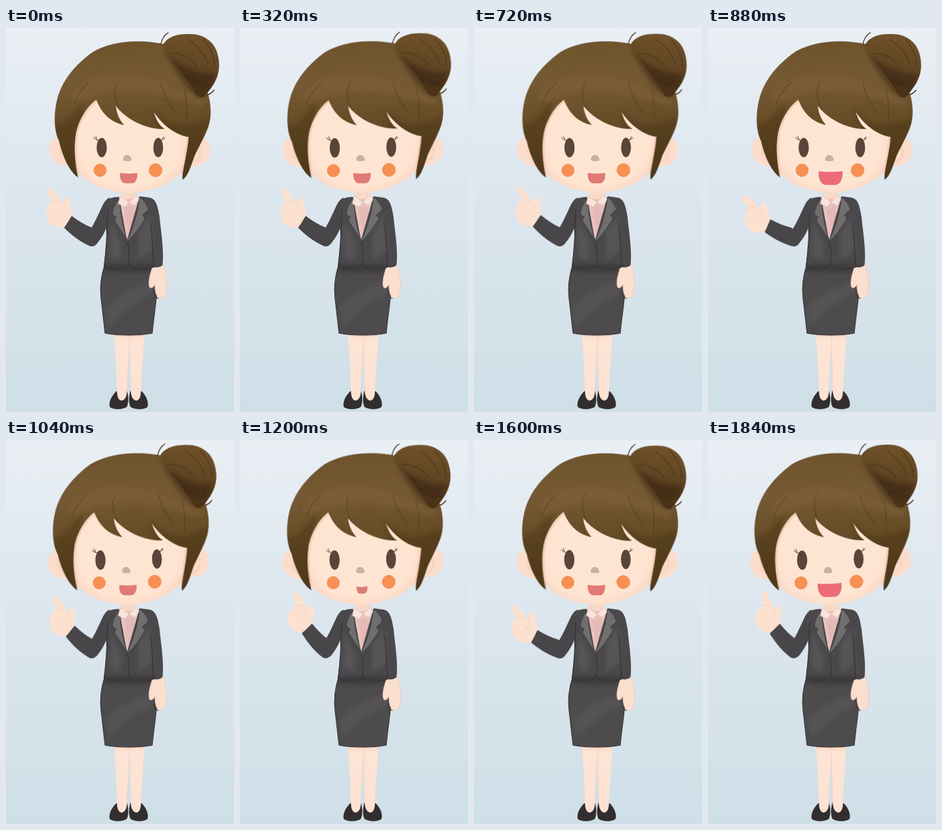
An HTML page that plays this animation: 343x575 px, repeating every 1.92 s.

```html
<!DOCTYPE html>
<html lang="en">
<head>
<meta charset="utf-8">
<title>Pointing assistant</title>
<style>
  html, body { margin: 0; width: 100%; height: 100%; overflow: hidden; background: #dce6ee; }
  svg { display: block; width: 343px; height: 575px; }
  .line { fill: none; stroke-linecap: round; stroke-linejoin: round; }
  .soft { filter: url(#blur); }
  .crayon { filter: url(#fuzz); }
</style>
</head>
<body>
<svg viewBox="0 0 343 575">
  <defs>
    <linearGradient id="sky" x2="0" y2="1">
      <stop offset="0" stop-color="#e9eff4"/>
      <stop offset=".45" stop-color="#dce6ee"/>
      <stop offset="1" stop-color="#cfdfe7"/>
    </linearGradient>
    <linearGradient id="hairFill" gradientUnits="userSpaceOnUse" x1="180" y1="20" x2="190" y2="225">
      <stop offset="0" stop-color="#6f532d"/>
      <stop offset=".3" stop-color="#765a34"/>
      <stop offset=".58" stop-color="#674c27"/>
      <stop offset="1" stop-color="#4f391d"/>
    </linearGradient>
    <linearGradient id="bunFill" x1=".6" x2=".4" y2="1">
      <stop offset="0" stop-color="#70532c"/>
      <stop offset=".5" stop-color="#624623"/>
      <stop offset="1" stop-color="#472f16"/>
    </linearGradient>
    <linearGradient id="legFill" x2="0" y2="1">
      <stop offset="0" stop-color="#f9d3be"/>
      <stop offset=".1" stop-color="#fde4d4"/>
      <stop offset="1" stop-color="#fde2d2"/>
    </linearGradient>
    <radialGradient id="faceFill" gradientUnits="userSpaceOnUse" cx="186" cy="165" r="98">
      <stop offset="0" stop-color="#fee6d4"/>
      <stop offset=".78" stop-color="#fee4d1"/>
      <stop offset="1" stop-color="#fcd8c5"/>
    </radialGradient>
    <filter id="blur" x="-30%" y="-30%" width="160%" height="160%"><feGaussianBlur stdDeviation="3"/></filter>
    <filter id="fuzz" x="-5%" y="-5%" width="110%" height="110%"><feGaussianBlur stdDeviation=".45"/></filter>
    <path id="hairShape" d="M108 223C98 217 86 196 80 169C72 154 72 128 77 108C84 79 104 55 131 36C158 20 200 16 241 25C270 42 292 65 301 91C309 111 309 132 305 145C301 158 293 172 284 190C278 206 274 221 266 227C264 218 273 190 275 163C259 161 238 149 222 125C225 137 231 147 238 151C217 152 184 141 165 116C166 128 170 137 177 145C160 141 145 131 136 107C122 117 109 137 105 158C101 181 104 203 108 223Z"/>
    <path id="bunShape" d="M236 26C241 14 257 8 277 9C297 9 312 20 317 35C322 49 322 65 316 77C312 86 308 90 304 96C298 101 290 99 283 92C271 76 250 49 236 26Z"/>
    <path id="skirtShape" d="M148 356C143 372 141 388 143 405L149 457C168 461 202 461 220 457C222 435 226 412 227 393L225 356Z"/>
    <path id="jacketShape" d="M170 253C162 253 154 254 150 261C147 278 152 300 151 322L147 357C158 363 174 364 184 355C194 364 210 364 222 358C228 359 233 358 235.500 355C238 332 233 305 231 283C228 264 225 256 216 254L201 252L182 318Z"/>
    <clipPath id="hairClip"><use href="#hairShape"/></clipPath>
    <clipPath id="bunClip"><use href="#bunShape"/></clipPath>
    <clipPath id="skirtClip"><use href="#skirtShape"/></clipPath>
    <clipPath id="jacketClip"><use href="#jacketShape"/></clipPath>
  </defs>

  <rect width="343" height="575" fill="url(#sky)"/>

  <g class="crayon" id="legs">
    <g fill="#322e30">
      <path d="M166 544C159 550 154 561 156 567C160 572 176 572 182 567C185 559 184 550 182 543Z"/>
      <path d="M187 543C185 551 184 560 187 567C193 572 209 572 213 567C215 561 211 550 204 544Z"/>
    </g>
    <g fill="url(#legFill)">
      <path d="M162 457C165 485 166 515 167 543C167 552 169 557 174 558C180 557 182 550 182 542C181 525 185 495 186 457Z"/>
      <path d="M186 457C186 490 187 525 187.500 542C188 550 190 557 196 558C201 557 203 552 203 543C203 525 207 490 208 457Z"/>
    </g>
    <path class="line" stroke="#f8d2bf" opacity=".7" d="M186 460C186 490 182 520 182 544M186 460C186 490 188 520 188 544"/>
  </g>

  <g class="crayon">
    <use href="#skirtShape" fill="#4d4b4c"/>
    <g clip-path="url(#skirtClip)">
      <path class="soft" fill="#555354" d="M150 420C166 398 192 389 222 378L220 400C194 406 174 428 154 448Z"/>
      <path class="soft" fill="#3f3d3f" d="M140 351H228V364C200 368 169 368 144 364Z"/>
    </g>
    <use href="#skirtShape" class="line" stroke="#3a383a" stroke-width="1.2"/>
  </g>

  <path fill="#fbdfce" stroke="#f1c7b3" stroke-width=".8" d="M222 353C217 367 213 381 216 388C218 391 222 388 224 384C224 391 225 400 229 403C234 407 239 403 240 397C243 386 242 372 236 353Z"/>
  <path class="line" stroke="#3a383a" stroke-width="1.200" d="M223 392C222 399 225 404 229 405"/>

  <path fill="#f8d9c8" d="M176 239H194L197 257L184 270L171 257Z"/>
  <path fill="#e9c2bd" d="M171 257L199 255L200 275L183 317L166 277Z"/>
  <path fill="#dfb1ae" d="M178 268L191 267L196 283L184 306Z" opacity=".45"/>

  <g id="forearm">
    <path fill="#fde1d0" d="M99 286C99 276 98 264 95 256C92 251 88 255 87 263C80 256 74 244 66 240C59 239 62 250 69 260C60 267 58 282 64 291C70 299 82 300 93 298Z"/>
    <path class="line" stroke="#f5cfbb" d="M69 261C74 258 80 259 84 264M87 263C90 269 87 275 81 278"/>
    <path class="crayon" fill="#484648" stroke="#3a383a" d="M99 282C108 289 118 295 128 299L140 312C139 325 131 329 124 325C111 319 99 310 88 299C92 294 95 288 99 282Z"/>
  </g>

  <g class="crayon">
    <path fill="#484648" d="M156 254C147 257 144 270 138 281C134 290 129 299 124 306C121 318 128 328 136 323C144 316 150 303 155 289Z"/>
    <use href="#jacketShape" fill="#4a484a"/>
    <g clip-path="url(#jacketClip)">
      <path class="soft" fill="#575556" d="M157 287L175 325L171 348L156 341ZM199 306L217 280L221 333L199 348Z"/>
      <path class="soft" fill="#3d3b3d" d="M145 354H225V365H145Z"/>
    </g>
    <g class="line" stroke="#353335" stroke-width="1.2">
      <path d="M153 272C152 290 153 312 148 356C159 363 174 363 184 355C194 364 210 363 222 358M182 319C186 332 186 345 184 355M217 291C221 311 220 333 222 357"/>
    </g>
    <g fill="#706e6f" stroke="#454345" stroke-linejoin="round">
      <path d="M171 255C165 261 161 270 160 279L166 283L163 288L182 317C176 299 172 280 171 255Z"/>
      <path d="M201 253C207 258 212 264 214 272L205 280L209 285C201 299 192 311 180 322C189 306 197 285 201 253Z"/>
    </g>
  </g>
  <path fill="#f8e4dc" stroke="#dfbdb1" stroke-width=".8" d="M172 251L169 263L179 268L185 261L194 266L200 257L196 250L185 261Z"/>

  <g id="head">
    <g fill="#fcdccb">
      <path d="M85 164C70 160 63 174 66 188C70 202 83 209 98 206V169Z"/>
      <path d="M289 165C304 162 309 176 307 188C303 201 294 208 278 207L275 176Z"/>
    </g>
    <g class="line" stroke="#f6c9b5" stroke-width="4" opacity=".45">
      <path d="M82 180C80 190 85 198 92 198M292 179C295 189 290 198 283 200"/>
    </g>
    <path fill="url(#faceFill)" d="M102 105C98 142 98 180 104 207C113 229 145 245 184 246C224 246 258 228 270 207C281 180 284 142 280 110Z"/>
    <path class="line soft" stroke="#f7c9b6" stroke-width="3" opacity=".45" d="M108 213C123 234 153 241 184 242C220 242 252 228 267 208"/>
    <path class="line" stroke="#f5c8b2" stroke-width="3" opacity=".7" d="M137 109C123 119 111 137 107 158C103 180 106 202 109 219M273 166C271 188 266 204 265 218"/>

    <g class="crayon">
      <use href="#hairShape" fill="url(#hairFill)"/>
      <g clip-path="url(#hairClip)">
        <path class="soft" fill="#7d613a" opacity=".65" d="M96 104C118 65 176 61 237 82L300 105L296 118C231 98 164 80 111 112Z"/>
        <path class="soft" fill="#4a3419" opacity=".45" d="M72 143C86 151 101 126 118 108L104 225H87ZM218 119C243 151 266 153 309 133L277 230L263 165L231 154Z"/>
        <path class="soft" fill="#3f2b13" opacity=".6" d="M245 29C264 64 280 84 303 96L292 105C270 91 249 60 238 29Z"/>
      </g>
      <use href="#bunShape" fill="url(#bunFill)"/>
      <g clip-path="url(#bunClip)">
        <path class="soft" fill="#3a2612" opacity=".6" d="M246 43C266 58 286 70 315 69L300 102H278Z"/>
      </g>
      <path fill="#4a3217" d="M280 80C286 87 296 91 306 87C300 93 304 103 294 104C286 103 280 94 280 80Z"/>
      <g class="line" stroke="#422c15" stroke-width="1.3">
        <path d="M233 24C235 15 239 10 244 7M303 100C307 99 310 97 313 93"/>
        <path opacity=".6" d="M247 38C264 37 280 45 288 59M274 18C287 25 298 38 303 53M297 17C307 29 314 43 314 57"/>
        <path opacity=".4" d="M125 81C113 92 107 101 103 113M169 80C161 92 163 108 171 123M233 83C239 105 246 116 255 127M268 92C273 110 272 128 271 140"/>
      </g>
      <use href="#hairShape" class="line" stroke="#573f20" stroke-width=".8" opacity=".6"/>
    </g>

    <path class="line" stroke="#7d6053" stroke-width="1.1" d="M132 164C134 166 136 168 139 168M135 162L137 167M239 164C237 167 235 168 232 168M237 163L235 167"/>
    <g class="eye" fill="#594639">
      <ellipse cx="144" cy="179" rx="7.7" ry="14.5"/>
      <ellipse cx="229" cy="179" rx="7.4" ry="14.5"/>
    </g>
    <path fill="#cbaea6" d="M176 198C176 193 179 190 182 190C186 190 189 194 189 198C186 200 179 200 176 198Z"/>
    <g fill="#f79052" stroke="#ee9360" stroke-width=".8">
      <circle cx="141.500" cy="213" r="9.4"/>
      <circle cx="225" cy="213" r="9.900"/>
    </g>
    <path id="mouth"/>
  </g>
</svg>
<script>
const STEP = 80, COUNT = 24;
// [step, value]: forearm degrees, and head tilt from 0 (right) to 1 (left)
const armKeys = [[0, 0], [2, -8.6], [4, 0], [6.4, 14.6], [7, 14.4], [11, -8.6], [13, 6.7],
  [15, 14], [17, -.7], [19, -8.6], [21, 0], [23, 13.5]];
const headKeys = [[0, 0], [1, 0], [4, .6], [5.5, 1], [7, .7], [10, 0], [11, 0], [13, .8],
  [14, 1], [17, 0], [18.5, 0], [23, 1]];
const talk = "mllmmsssmmlllmssmmllmsml";
const blink = { 7: .34, 8: .34 };
// mouth: half width, top, bottom, colour
const mouths = {
  s: [8, 219, 230, "#d97f76"],
  m: [13, 217, 232.5, "#e07a75"],
  l: [18, 214.5, 235, "#eb6c78"]
};

const get = id => document.getElementById(id);
const arm = get("forearm"), head = get("head"), mouth = get("mouth");
const eyes = document.querySelector(".eye");

const slope = (a, b) => (b[1] - a[1]) / (b[0] - a[0]);

// Smooth curve that never overshoots its keys
function tangent(keys, i) {
  if (i === 0 || i === keys.length - 1) return 0;
  const a = slope(keys[i - 1], keys[i]), b = slope(keys[i], keys[i + 1]);
  return a * b <= 0 ? 0 : 2 * a * b / (a + b);
}

function curve(keys, x) {
  let i = 0;
  while (i < keys.length - 2 && x > keys[i + 1][0]) i++;
  const [x0, y0] = keys[i], [x1, y1] = keys[i + 1];
  const w = x1 - x0, u = (x - x0) / w, v = 1 - u;
  return y0 * (1 + 2 * u) * v * v + y1 * u * u * (3 - 2 * u)
    + w * u * v * (v * tangent(keys, i) - u * tangent(keys, i + 1));
}

function mouthPath(half, top, bottom) {
  const l = 184.5 - half, r = 184.5 + half, h = bottom - top;
  return `M${l} ${top}Q184.5 ${top + 2} ${r} ${top}C${r + 1} ${top + h * .6} ${r - half * .25} ${bottom} ${r - half * .6} ${bottom}`
    + `H${l + half * .6}C${l + half * .25} ${bottom} ${l - 1} ${top + h * .6} ${l} ${top}Z`;
}

function pose(n) {
  arm.setAttribute("transform", `rotate(${curve(armKeys, n)} 130 317)`);
  head.setAttribute("transform", `rotate(${-1.35 * curve(headKeys, n)} 185 280)`);
  const open = blink[n] || 1;
  eyes.setAttribute("transform", `translate(0 ${179 * (1 - open)}) scale(1 ${open})`);
  const [half, top, bottom, color] = mouths[talk[n]];
  mouth.setAttribute("d", mouthPath(half, top, bottom));
  mouth.setAttribute("fill", color);
}

const start = performance.now();
let shown = -1;
function tick() {
  const n = Math.floor((performance.now() - start) / STEP) % COUNT;
  if (n !== shown) pose(shown = n);
  requestAnimationFrame(tick);
}
tick();
</script>
</body>
</html>
```
